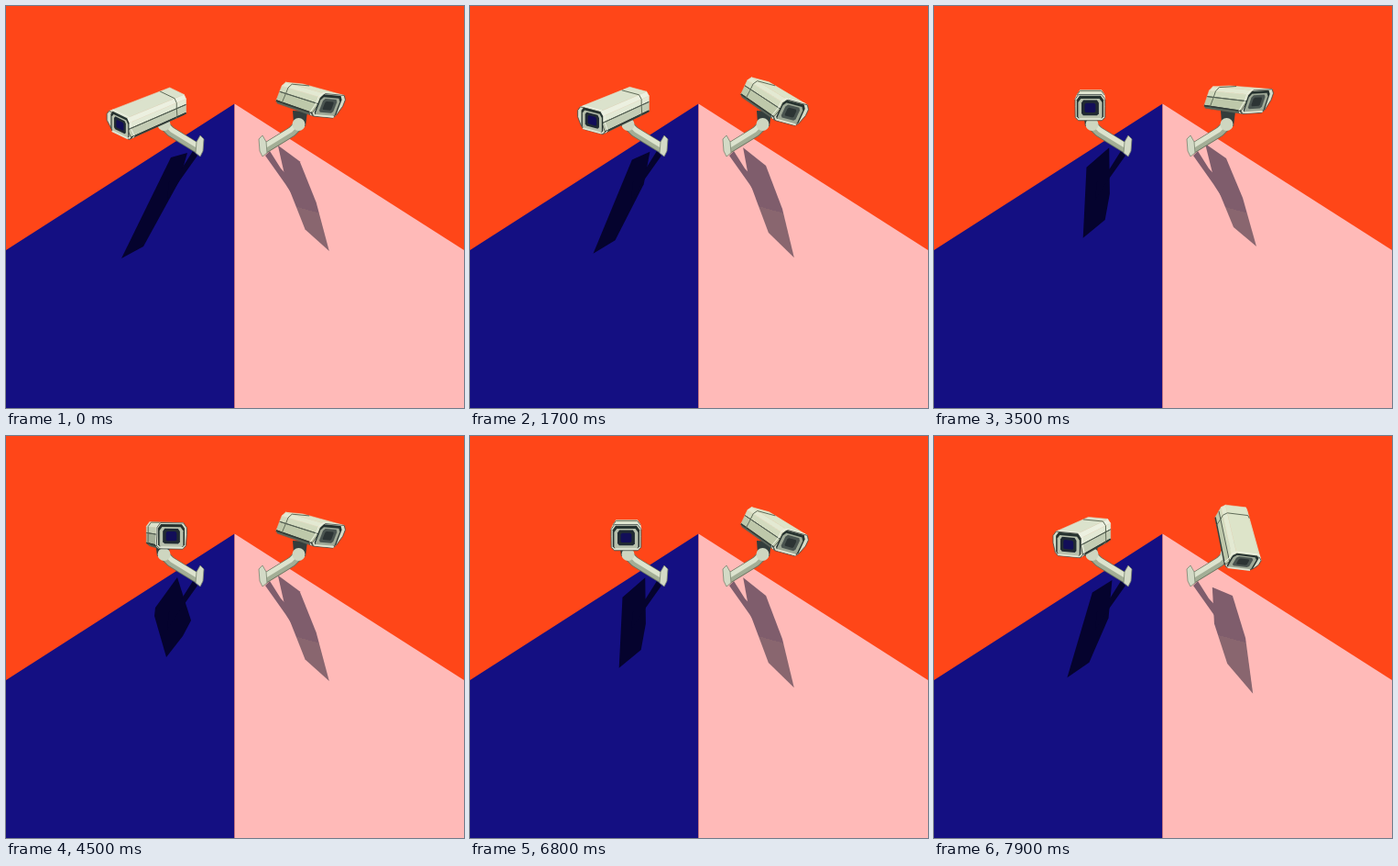
An HTML page with a canvas that plays this animation: 500 by 438 pixels, repeating every 8 s.

```html
<!DOCTYPE html>
<html lang="en">
<head>
<meta charset="utf-8">
<title>Two cameras</title>
<style>
html, body { margin: 0; width: 100%; height: 100%; overflow: hidden; background: #ff4618; }
canvas { display: block; }
</style>
</head>
<body>
<canvas id="stage" width="500" height="438"></canvas>
<script>
const ctx = document.getElementById('stage').getContext('2d');
const LOOP = 8000, STEP = 100;
const { sin, cos } = Math;

// Half of the housing's cross-section, from the top down (x right, y up).
const HALF = [[.78, 1], [1, .65], [1, .1], [1, -.75], [.8, -1]];
const PROFILE = [...HALF, ...HALF.map(([x, y]) => [-x, y]).reverse()];

const mix = (a, b, u) => a + (b - a) * u;
const mixPoint = (a, b, u) => [mix(a[0], b[0], u), mix(a[1], b[1], u)];

// Eased step from 0 to 1 between two times.
function ramp(t, from, to) {
  const u = Math.min(1, Math.max(0, (t - from) / (to - from)));
  return u * u * (3 - 2 * u);
}

function poly(points, fill, stroke, width = 1) {
  ctx.beginPath();
  points.forEach(([x, y]) => ctx.lineTo(x, y));
  ctx.closePath();
  if (fill) { ctx.fillStyle = fill; ctx.fill(); }
  if (stroke) { ctx.strokeStyle = stroke; ctx.lineWidth = width; ctx.stroke(); }
}

function line(points, color, width) {
  ctx.beginPath();
  points.forEach(([x, y]) => ctx.lineTo(x, y));
  ctx.strokeStyle = color;
  ctx.lineWidth = width;
  ctx.stroke();
}

// Warm grey for the pink wall, darker above a slanted edge.
const pinkShade = ctx.createLinearGradient(333, 192, 317, 250);
pinkShade.addColorStop(.5, '#7f5d6c');
pinkShade.addColorStop(.5, '#89666f');

// Each pose gives the body centre, half width, half height and forward vectors.
const left = {
  angle: t => -.82 + .97 * (ramp(t, 600, 4500) - ramp(t, 5800, 9700)),
  pose(a) {
    const x = 85 * sin(a), s = sin(a) ** 2;
    return {
      centre: [171 + .25 * x, 107.5 + 17 * s],
      wide: [16.3 * cos(a), 10 * s],
      high: [0, -14.3 + 4 * s],
      ahead: [x, 6 - .32 * x]
    };
  },
  // Shadow outlines at three angles: far turn, facing out, opposite turn.
  shadowAt: [-.82, .02, .15],
  shadows: [
    [[180, 165], [198, 160], [189, 191], [150, 262], [126, 275], [152, 222]],
    [[166, 176], [191, 154], [192, 205], [188, 232], [164, 252], [165, 215]],
    [[163, 187], [187, 154], [202, 201], [193, 218], [175, 241], [162, 196]]
  ],
  mirrored: true,
  shade: '#05032e',
  tones: ['#ecf0e0', '#e3e9d5', '#c3ccb4', '#505b50', '#39433e', '#505b50', '#a3ad97', '#c3ccb4', '#dbe2cc', '#dbe2cc'],
  plate: '#b7c0ac', glass: '#202a32', lens: '#120e58'
};

const right = {
  angle: t => .24 + .23 * ramp(t, 500, 1800) - .38 * ramp(t, 1800, 3500)
    + .15 * ramp(t, 3500, 4500) + 1.1 * ramp(t, 6200, 8200),
  pose(a) {
    const s = sin(a) ** 2, d = sin(2 * a);
    return {
      centre: [331, 101.5 + 10 * s],
      wide: [13 + 3 * s, 7 * d - 2],
      high: [4 + 2 * d, -13 + 4.7 * s],
      ahead: [43 * cos(a), 55 * sin(a)]
    };
  },
  shadowAt: [.09, .45, 1.3],
  shadows: [
    [[296, 150], [319, 166], [337, 209], [352, 262], [327, 241], [306, 190]],
    [[298, 154], [323, 174], [341, 221], [354, 274], [326, 247], [305, 191]],
    [[304, 165], [326, 174], [340, 220], [348, 281], [320, 248], [306, 205]]
  ],
  mirrored: false,
  shade: pinkShade,
  tones: ['#d9e0c8', '#b4bea6', '#909b88', '#505b50', '#39433e', '#59645a', '#bec8aa', '#d3dbbf', '#e3e9d2', '#dde4c9'],
  plate: '#9ea896', glass: '#4a5450', lens: '#2c3434'
};

function drawShadow(cam, a) {
  const [from, mid, to] = cam.shadowAt;
  const i = a < mid ? 0 : 1;
  const u = i ? (a - mid) / (to - mid) : (a - from) / (mid - from);
  poly(cam.shadows[i].map((p, k) => mixPoint(p, cam.shadows[i + 1][k], u)), cam.shade);
}

function drawMount(cam) {
  ctx.save();
  if (cam.mirrored) {
    ctx.translate(492, 0);
    ctx.scale(-1, 1);
  }
  poly([[283, 163], [288, 158], [300, 177], [314, 192], [316, 211], [305, 194]], cam.shade);
  poly([[313, 114], [329, 115], [327, 131], [314, 128]], '#333d3c');
  const arm = [[281, 156], [299, 145], [312, 137], [319, 130]];
  line(arm, '#68735f', 11);
  line(arm, '#a3ae96', 9.5);
  line(arm.map(([x, y]) => [x - 1, y - 2]), '#dce3ce', 5);
  poly([[276, 145], [280, 141], [284, 148], [285, 160], [280, 164], [277, 158]], '#d3dac6', '#79856f', .8);
  ctx.beginPath();
  ctx.arc(319.5, 129, 7, 0, 7);
  ctx.fillStyle = '#ced6c0';
  ctx.fill();
  ctx.restore();
}

function drawBody(cam, a) {
  const { centre, wide, high, ahead } = cam.pose(a);
  // Depth runs from 0 at the front to 1 at the rear, which is a little smaller.
  const at = ([x, y], depth) => [0, 1].map(i =>
    centre[i] + ahead[i] * (.5 - depth) + (1 - .1 * depth) * (x * wide[i] + y * high[i]));
  // The hood reaches further forward than the lower shell.
  const front = PROFILE.map(p => at(p, p[1] > 0 ? -.05 : .02));
  const back = PROFILE.map(p => at(p, 1));
  const faces = PROFILE.map((_, i) => [i, (i + 1) % PROFILE.length]).filter(([i, j]) =>
    (front[j][0] - front[i][0]) * (back[i][1] - front[i][1]) <
    (front[j][1] - front[i][1]) * (back[i][0] - front[i][0]));

  for (const [i, j] of faces) {
    poly([front[i], front[j], back[j], back[i]], cam.tones[i], cam.tones[i], .6);
  }
  for (const [i, j] of faces) {
    if (PROFILE[i][1] + PROFILE[j][1] < 0 && i !== 4) {
      const [seam, edge] = i < 5 ? [2, 3] : [7, 6];
      line([front[seam], back[seam]], '#525e52', 1);
      line([front[edge], back[edge]], '#323c38', 1.4);
    }
    for (const [u, color] of [[.84, '#606b58'], [.06, '#f1f4e7']]) {
      line([mixPoint(front[i], back[i], u), mixPoint(front[j], back[j], u)], color, 1);
    }
  }

  // Nested outlines: rim, dark recess, face plate, window and lens.
  const inset = (k, drop) => PROFILE.map(([x, y]) => at([x * k, y * k - drop], 0));
  poly(front, '#d5dcc8', '#3c4743', .8);
  poly(inset(.9, 0), '#26322f');
  poly(inset(.8, .12), cam.plate);
  poly(inset(.58, .02), cam.glass);
  poly(inset(.36, .02), cam.lens);
  line([at([-.78, -.88], 0), at([.78, -.88], 0)], '#dfe5d3', 1.8);
}

function drawWalls() {
  ctx.fillStyle = '#ff4618';
  ctx.fillRect(0, 0, 500, 438);
  poly([[249.5, 106.5], [249.5, 438], [0, 438], [0, 266]], '#140f82');
  poly([[249.5, 106.5], [500, 266], [500, 438], [249.5, 438]], '#ffbab8');
}

function draw(now) {
  const t = Math.floor(now % LOOP / STEP) * STEP;
  ctx.lineJoin = 'round';
  drawWalls();
  for (const cam of [left, right]) {
    const a = cam.angle(t);
    drawShadow(cam, a);
    drawMount(cam);
    drawBody(cam, a);
  }
}

const start = performance.now();
function tick() {
  draw(performance.now() - start);
  requestAnimationFrame(tick);
}
tick();
</script>
</body>
</html>
```
